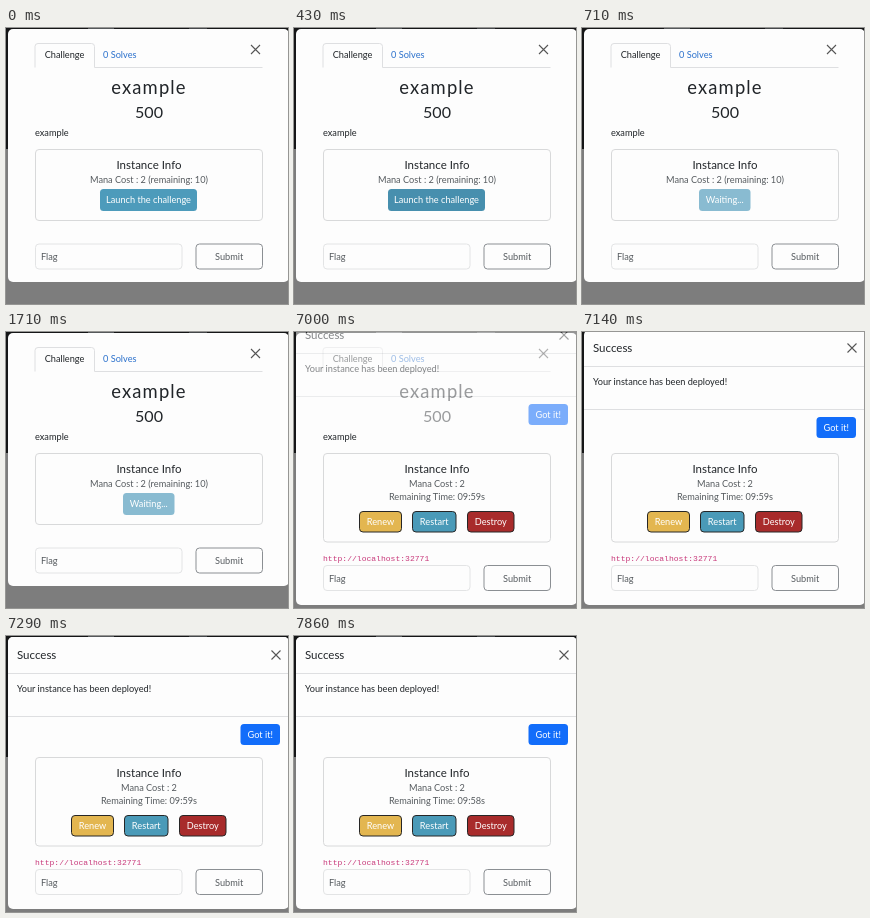
An HTML page for the animation above (8000 ms loop, 282x276 px).

```html
<!DOCTYPE html>
<html lang="en">
<head>
<meta charset="utf-8">
<title>Challenge instance</title>
<style>
  html, body { margin: 0; width: 100%; height: 100%; overflow: hidden; background: #7d7d7d; }
  svg { display: block; width: 100%; height: 100%; }
  text { font-family: Lato, sans-serif; font-size: 9.2px; fill: #212529; }
  .mid { text-anchor: middle; }
  .title { font-size: 11.5px; }
  .h2 { font-size: 18.4px; letter-spacing: 1.15px; }
  .h3 { font-size: 16.1px; }
  .soft { fill: #555a5e; }
  .light { fill: #fff; }
  .link { fill: #2a70cc; }
  .code { font-family: "Liberation Mono", monospace; font-size: 8.05px; fill: #c8387a; }
  .line { fill: none; stroke: #dedfe1; }
  .x { fill: none; stroke: #555; stroke-width: 1.1; }
</style>
</head>
<body>
<svg id="stage" viewBox="0 0 282 276" preserveAspectRatio="none"></svg>
<script>
const LOOP = 8000;
const PAPER = "#fdfdfd";
const stage = document.getElementById("stage");

const text = (x, y, s, cls = "", id = "") =>
  `<text x="${x}" y="${y}" class="${cls}" id="${id}">${s}</text>`;
const box = (x, y, w, h, r, fill, stroke = "none", id = "") =>
  `<rect x="${x}" y="${y}" width="${w}" height="${h}" rx="${r}" fill="${fill}" stroke="${stroke}" id="${id}"/>`;
const button = (x, y, w, h, fill, label, stroke = "none", id = "") =>
  box(x, y, w, h, 3.5, fill, stroke, id) + text(x + w / 2, y + h / 2 + 3.2, label, "mid light");
const cross = (x, y) =>
  `<path class="x" d="M${x - 4.5} ${y - 4.5}l9 9m0-9l-9 9"/>`;
const group = (id, ...parts) => `<g id="${id}">${parts.join("")}</g>`;

stage.innerHTML = [
  // page behind the dialog
  box(0, 0, 282, 276, 0, "#7d7d7d"),
  box(0, 0, 282, 121, 0, "#151617"),
  box(82, 0, 26, 1, 0, "#55585a"),
  box(183, 0, 18, 1, 0, "#45484a"),

  // challenge dialog
  box(2, 1, 281, 253, 5, PAPER, "none", "dialog"),
  `<path class="line" d="M29 39.5V18.5q0-3 3-3H85.5q3 0 3 3V39.5H256.5"/>`,
  text(58.5, 30.3, "Challenge", "mid"),
  text(97, 30.3, "0 Solves", "link"),
  cross(249.5, 21.5),
  text(143, 66, "example", "mid h2"),
  text(143, 90, "500", "mid h3"),
  text(29, 108, "example"),
  box(29.5, 121.5, 227, 71, 3.5, PAPER, "#d8d9da", "card"),
  text(143, 141, "Instance Info", "mid title"),
  text(143, 155, "", "mid soft", "mana"),
  group("launch", button(94, 161, 97, 22, "#4d9bbb", "Launch the challenge", "none", "launchBox")),
  group("wait", button(117, 161, 51.5, 22, "#89bbd1", "Waiting...", "none", "waitBox")),
  group("running",
    text(143, 168, "", "mid soft", "clock"),
    button(65.5, 179.5, 42, 20.5, "#e3b650", "Renew", "#262626"),
    button(118.5, 179.5, 43.5, 20.5, "#4a9ab8", "Restart", "#262626"),
    button(173.5, 179.5, 46.5, 20.5, "#a82b2b", "Destroy", "#262626"),
    text(29, 229.3, "http://localhost:32771", "code")),
  group("form",
    box(29.5, 216, 146.5, 25, 3.5, PAPER, "#e3e4e5"),
    text(35, 232, "Flag", "soft"),
    box(190, 216, 66.5, 25, 3.5, PAPER, "#8b8f93"),
    text(223.2, 232, "Submit", "mid soft")),

  // success dialog
  group("toast",
    box(2, 1, 281, 117, 5, PAPER),
    `<path class="line" d="M2 37.5H282M2 80.5H282"/>`,
    text(11, 23, "Success", "title"),
    cross(270, 19),
    text(11, 56.3, "Your instance has been deployed!"),
    button(234.5, 88, 39.5, 21, "#126dfa", "Got it!"))
].join("");

const el = id => document.getElementById(id);
const show = (id, on) => el(id).setAttribute("display", on ? "inline" : "none");
const set = (id, name, value) => el(id).setAttribute(name, value);

// value of the last [time, value] step already reached
const step = (t, steps) => steps.reduce((v, [at, next]) => t >= at ? next : v, steps[0][1]);

function draw(t) {
  const running = t >= 6860;
  const waiting = t >= 570 && !running;

  show("launch", t < 570);
  show("wait", waiting);
  show("running", running);
  set("launchBox", "fill", step(t, [[0, "#4d9bbb"], [290, "#478fae"]]));
  set("waitBox", "fill", step(t, [[0, "#6eacc7"], [710, "#89bbd1"]]));

  set("dialog", "height", running ? 272 : 253);
  set("card", "height", running ? 88.5 : 71);
  set("form", "transform", `translate(0 ${running ? 17.5 : 0})`);
  el("mana").textContent = running ? "Mana Cost : 2" : "Mana Cost : 2 (remaining: 10)";
  el("clock").textContent = `Remaining Time: 09:${t < 7710 ? 59 : 58}s`;

  show("toast", t >= 7000);
  set("toast", "opacity", step(t, [[7000, 0.55], [7140, 1]]));
  set("toast", "transform", `translate(0 ${step(t, [[7000, -16], [7140, -3], [7290, 0]])})`);
}

const start = performance.now();
function tick() {
  draw((performance.now() - start) % LOOP);
  requestAnimationFrame(tick);
}
tick();
</script>
</body>
</html>
```
